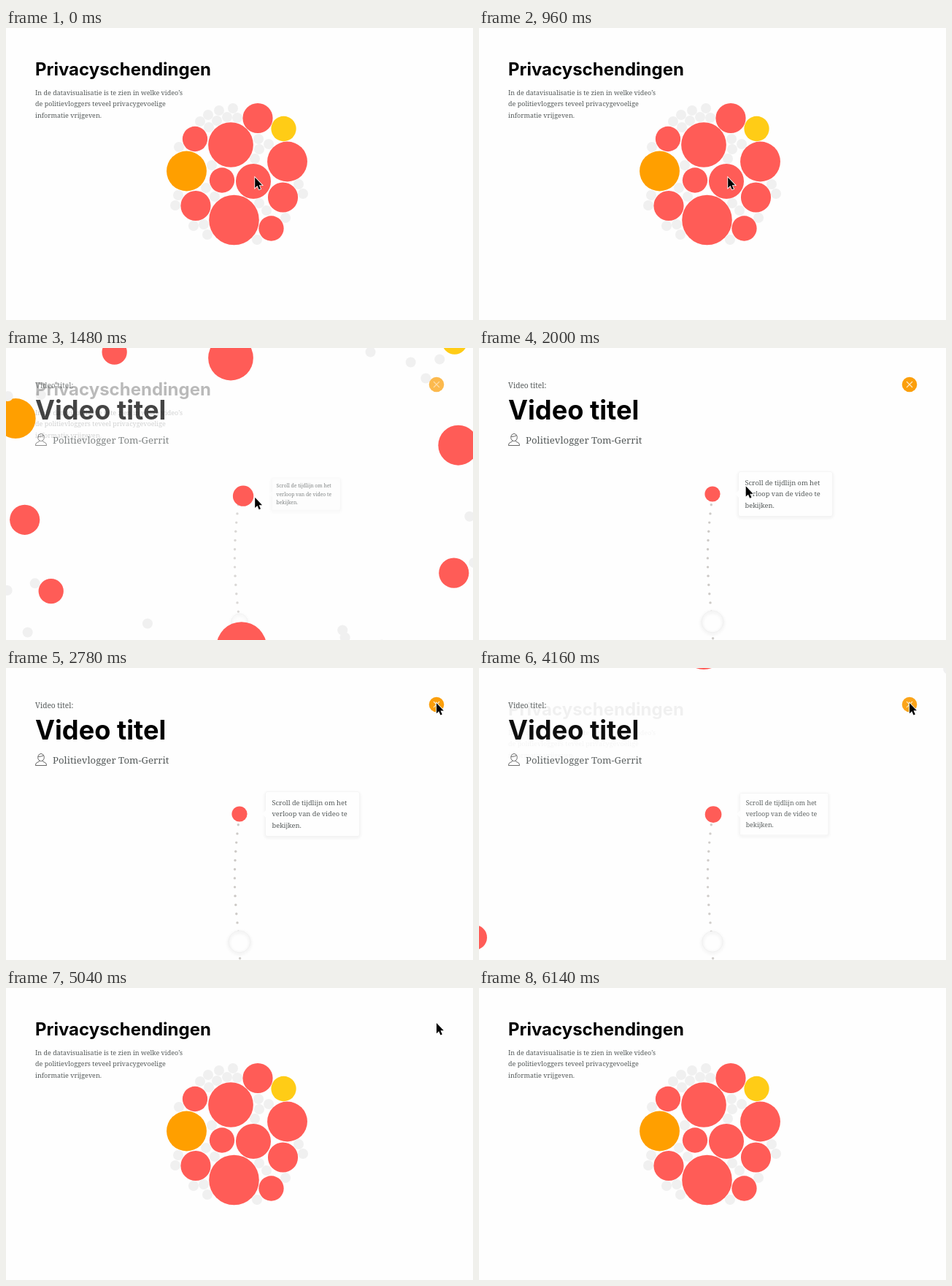
An HTML page with a canvas that plays this animation: 640x400 px, repeating every 6.78 s.

```html
<!DOCTYPE html>
<html lang="nl">
<head>
<meta charset="utf-8">
<title>Privacyschendingen</title>
<style>
  html, body { margin: 0; width: 100%; height: 100%; overflow: hidden; background: #fefefe; }
  canvas { display: block; width: 640px; height: 400px; }
</style>
</head>
<body>
<canvas id="stage" width="640" height="400"></canvas>
<script>
const ctx = document.getElementById('stage').getContext('2d');
const WIDTH = 640, HEIGHT = 400, LOOP = 6780;
const RED = '#ff5c57', ORANGE = '#ff9f00', YELLOW = '#ffcc16', GRAY = '#f0f0f0';
const PAPER = '#fefefe', INK = '#555a5a';
const SERIF = '"Noto Serif", serif';
const SANS = 'Inter, sans-serif';
const UNIT = 3.43, DOT = 7, DOT_COUNT = 27;

const mix = (a, b, k) => a + (b - a) * k;
const span = (t, from, length) => Math.min(1, Math.max(0, (t - from) / length));

function bezier(x1, y1, x2, y2) {
  const at = (a, b, s) => 3 * (1 - s) * (1 - s) * s * a + 3 * (1 - s) * s * s * b + s * s * s;
  return x => {
    if (x <= 0 || x >= 1) return x;
    let lo = 0, hi = 1;
    for (let i = 0; i < 24; i++) {
      const mid = (lo + hi) / 2;
      if (at(x1, x2, mid) < x) lo = mid; else hi = mid;
    }
    return at(y1, y2, lo);
  };
}
const ease = bezier(0.25, 0.1, 0.25, 1);
const glide = bezier(0.4, 0, 0.1, 1);
const leave = bezier(0.4, 0, 0.8, 0.8);

// Everything leaves along its heading, as far as a half-stage box allows
function mover(x, y, r, heading, fill) {
  const c = Math.cos(heading), s = Math.sin(heading);
  const reach = Math.min(WIDTH / 2 / Math.abs(c), HEIGHT / 2 / Math.abs(s));
  return { x, y, r, fill, dx: c * reach, dy: s * reach };
}

const bubble = (x, y, weight, degrees, fill = RED) =>
  mover(x, y, weight * UNIT, degrees * Math.PI / 180, fill);

const focus = { x: 339, y: 210, r: 7 * UNIT };
const bubbles = [
  bubble(308, 160, 9, -90),
  bubble(345, 123.5, 6, -48),
  bubble(380.5, 138, 5, -32, YELLOW),
  bubble(259, 152, 5, -127),
  bubble(247.5, 196, 8, -157, ORANGE),
  bubble(385.5, 183, 8, -12),
  bubble(296, 208.5, 5, 152),
  bubble(260, 243.5, 6, 182),
  bubble(379.5, 232, 6, 18),
  bubble(312.5, 263, 10, 86),
  bubble(363.5, 274.5, 5, 70)
];

// Small dots fill the gaps between the bubbles, from the middle outwards
function fillGaps() {
  const spots = [], taken = [focus, ...bubbles], found = [];
  for (let y = -105; y <= 105; y++)
    for (let x = -105; x <= 105; x++) spots.push([x, y]);
  spots.sort((a, b) => Math.hypot(...a) - Math.hypot(...b));
  for (const [ox, oy] of spots) {
    if (found.length === DOT_COUNT) break;
    const x = 316 + ox, y = 203 + oy;
    if (taken.some(c => Math.hypot(c.x - x, c.y - y) < c.r + DOT)) continue;
    const heading = Math.atan2(y - 210, (x - 308) * (y < 210 ? 1.6 : 0.6));
    const dot = mover(x, y, DOT, heading, GRAY);
    found.push(dot);
    taken.push(dot);
  }
  return found;
}
const dots = fillGaps();

function disc(x, y, r, fill) {
  ctx.beginPath();
  ctx.arc(x, y, Math.max(0, r), 0, Math.PI * 2);
  ctx.fillStyle = fill;
  ctx.fill();
}

function text(str, x, y, font, fill = INK) {
  ctx.font = font;
  ctx.fillStyle = fill;
  ctx.fillText(str, x, y);
}

function lines(rows, x, y, leading, font) {
  rows.forEach((row, i) => text(row, x, y + i * leading, font));
}

function layer(alpha, draw) {
  if (alpha <= 0) return;
  ctx.save();
  ctx.globalAlpha = alpha;
  draw();
  ctx.restore();
}

function softEdge() {
  ctx.strokeStyle = '#f1f1f1';
  ctx.lineWidth = 1;
  ctx.shadowColor = 'rgba(0,0,0,.2)';
  ctx.shadowBlur = 4;
  ctx.shadowOffsetY = 1.5;
  ctx.stroke();
  ctx.shadowColor = 'transparent';
}

function overviewText() {
  text('Privacyschendingen', 40, 65, `700 24px ${SANS}`, '#000');
  lines(['In de datavisualisatie is te zien in welke video’s',
    'de politievloggers teveel privacygevoelige',
    'informatie vrijgeven.'], 40, 92, 15.3, `9px ${SERIF}`);
}

function personIcon() {
  ctx.strokeStyle = '#666';
  ctx.lineWidth = 1;
  ctx.beginPath();
  ctx.ellipse(48, 122.5, 4.3, 5, 0, 0, Math.PI * 2);
  ctx.moveTo(44, 121.5);
  ctx.quadraticCurveTo(49, 121.5, 52, 119.5);
  for (const side of [-1, 1]) {
    ctx.moveTo(48 + side * 2.2, 127);
    ctx.quadraticCurveTo(48 + side * 2.5, 128.8, 48 + side * 5, 129.3);
    ctx.quadraticCurveTo(48 + side * 7.6, 130, 48 + side * 7.6, 133.5);
    ctx.lineTo(48, 133.5);
  }
  ctx.stroke();
}

function detailText() {
  text('Video titel:', 40, 54.5, `10.2px ${SERIF}`);
  text('Video titel', 40, 98, `700 36.2px ${SANS}`, '#000');
  text('Politievlogger Tom-Gerrit', 64, 130.5, `13.2px ${SERIF}`);
  personIcon();
}

function timeline(q) {
  for (let y = 214.7; y < HEIGHT; y += 12.2) {
    const bow = Math.sin(Math.PI * (y - 200) / 175) * (y < 375 ? 6.6 : 1.5);
    disc(320 - bow, y, 1.7, '#cdcac7');
  }
  ctx.globalAlpha = 1;
  disc(320, 375, 15 * q, PAPER);
  ctx.globalAlpha = q;
  softEdge();
}

function tooltip(q) {
  ctx.translate(387, 201);
  ctx.scale(q, q);
  ctx.translate(-387, -201);
  ctx.fillStyle = PAPER;
  ctx.beginPath();
  ctx.roundRect(356, 170, 128, 60, 2);
  softEdge();
  ctx.moveTo(356, 195);
  ctx.lineTo(351, 200);
  ctx.lineTo(356, 205);
  ctx.fill();
  lines(['Scroll de tijdlijn om het', 'verloop van de video te', 'bekijken.'],
    364.5, 187.5, 15.8, `9.25px ${SERIF}`);
}

function closeButton() {
  disc(590, 50, 10.3, '#fb9f0c');
  ctx.strokeStyle = '#ffe9c8';
  ctx.lineWidth = 1.1;
  ctx.beginPath();
  for (const side of [-4, 4]) {
    ctx.moveTo(590 - side, 46);
    ctx.lineTo(590 + side, 54);
  }
  ctx.stroke();
}

function cluster(q) {
  for (const m of [...bubbles, ...dots]) disc(m.x + m.dx * q, m.y + m.dy * q, m.r, m.fill);
  disc(mix(focus.x, 320, q), mix(focus.y, 200, q), mix(focus.r, 10.6, q), RED);
}

function cursor(t) {
  if (t >= 6130) return;
  const go = glide(span(t, 1840, 960));
  const out = leave(span(t, 5830, 310));
  ctx.save();
  ctx.translate(mix(341.2, 590, go) + 34 * out, mix(204.8, 48, go) - 72 * out);
  ctx.scale(0.95, 0.95);
  ctx.beginPath();
  [[0, 0], [0, 15], [3.4, 11.9], [5.8, 17.3], [8.2, 16.3], [5.8, 10.9], [10.4, 10.9]]
    .forEach(([x, y]) => ctx.lineTo(x, y));
  ctx.closePath();
  ctx.strokeStyle = '#fff';
  ctx.lineWidth = 1.7;
  ctx.stroke();
  ctx.fillStyle = '#000';
  ctx.fill();
  ctx.restore();
}

function render(t) {
  const q = ease(span(t, 1328, 350)) - ease(span(t, 4136, 350));
  ctx.fillStyle = PAPER;
  ctx.fillRect(0, 0, WIDTH, HEIGHT);
  layer(q, () => timeline(q));
  cluster(q);
  layer(1 - q, overviewText);
  layer(q, detailText);
  layer(q, () => tooltip(q));
  layer(q, closeButton);
  cursor(t);
}

const begin = performance.now();
function tick() {
  render((performance.now() - begin) % LOOP);
  requestAnimationFrame(tick);
}
tick();
</script>
</body>
</html>
```
